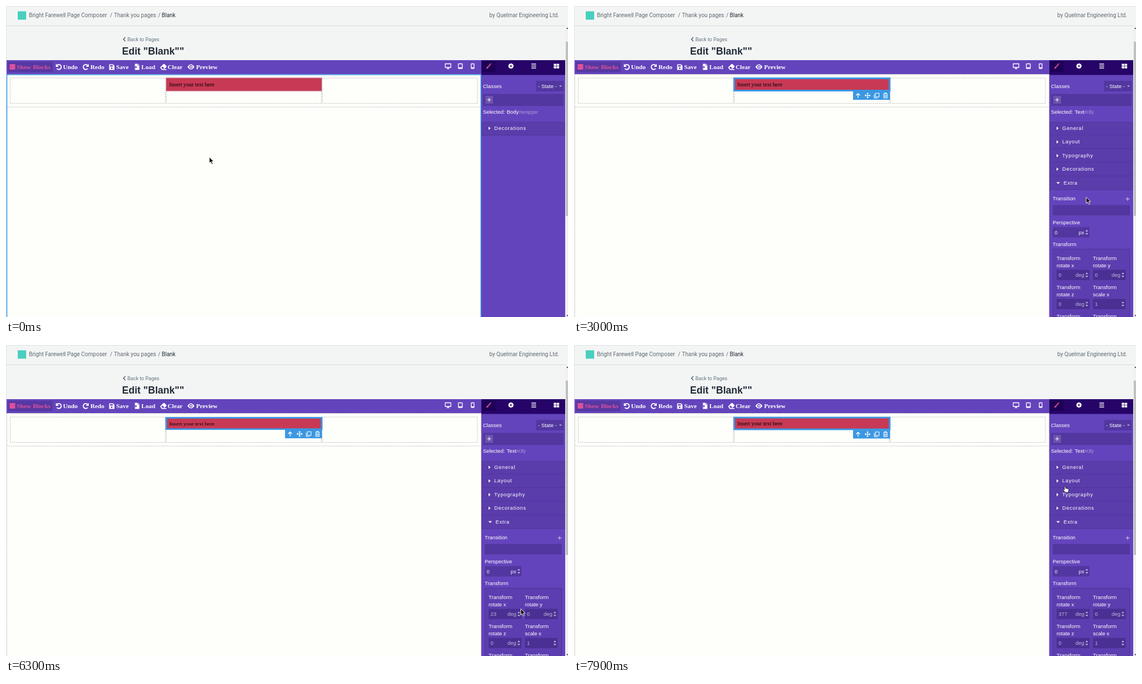
Recreate the animation shown at these times as an HTML page. Size 1005 by 557 pixels, loop 8000 ms.

```html
<!DOCTYPE html>
<html lang="en">
<head>
<meta charset="utf-8">
<title>Page editor</title>
<style>
html, body { margin: 0; width: 100%; height: 100%; overflow: hidden; background: #f3f5f5; }
svg { display: block; width: 100%; height: 100%; }
text { white-space: pre; }
.ui { font-family: Roboto, sans-serif; }
.side { font: 9.4px "Liberation Sans", Arial, sans-serif; fill: #fff; }
.head { font-size: 9.3px; letter-spacing: .7px; }
.bar { font: bold 11.2px "Liberation Serif", "Times New Roman", serif; fill: #fff; }
.badge { font: 8.4px "Liberation Sans", Arial, sans-serif; fill: #fff; }
.dash { fill: none; stroke: #bdbdbd; stroke-dasharray: 2 1.4; }
.line { fill: none; stroke: #fff; stroke-width: 1.3; }
.thin { fill: none; stroke: #fff; stroke-width: 1.1; }
.dim { fill: #fff; opacity: .65; }
.lit { fill: #fff; opacity: .95; }
</style>
</head>
<body>
<svg viewBox="0 0 1005 557" id="stage"></svg>
<script>
const BLUE = '#3b97e3', PURPLE = '#6444bc', FIELD = '#5237a0', DEEP = '#4a3093', EDGE = '#4d3398';

const rect = (x, y, w, h, fill, more = '') =>
  `<rect x="${x}" y="${y}" width="${w}" height="${h}" fill="${fill}" ${more}/>`;
const text = (x, y, s, more = '') => `<text x="${x}" y="${y}" ${more}>${s}</text>`;
const path = (d, more = 'fill="#fff"') => `<path d="${d}" ${more}/>`;
const group = (id, body) => `<g id="${id}">${body}</g>`;
const dash = (x, y, w, h) => rect(x, y, w, h, 'none', 'class="dash"');

const header = () =>
  rect(0, 0, 1005, 35, '#f3f5f4') +
  path('M0 .5H1005M.5 0V97', 'stroke="#dfe2e4"') +
  path('M0 35.5H1005', 'stroke="#d5dade"') +
  rect(21, 9.5, 15, 15, '#48cfc0') +
  `<g class="ui" font-size="10" fill="#5f6972">` +
  text(41, 20, 'Bright Farewell Page Composer') + text(186, 20, '/') +
  text(193, 20, 'Thank you pages') + text(272, 20, '/') +
  text(278.5, 20, 'Blank', 'fill="#212b36"') +
  text(989, 20, 'by Quelmar Engineering Ltd.', 'text-anchor="end"') +
  text(217, 63, 'Back to Pages', 'font-size="9" fill="#637381"') + '</g>' +
  path('M213.5 56l-3.5 3.6 3.5 3.6', 'fill="none" stroke="#55636f" stroke-width="1.5"') +
  text(207.5, 87, 'Edit "Blank""',
    'font-family="Liberation Sans, Arial, sans-serif" font-weight="bold" font-size="17.6" fill="#212b36"');

const undo = 'M90 104.5v3.5h3.5M90.3 107.6a4.4 4.4 0 1 1 .6 4.4';
const toolbar = () =>
  rect(1, 97, 849, 25, PURPLE) + rect(4, 100, 79.5, 18.5, '#5638a2') +
  rect(6.5, 104, 10, 10, '#dc4f9d') +
  '<g class="bar">' + text(19, 113, 'Show Blocks', 'fill="#dc4f9d"') +
  [[102, 'Undo'], [151, 'Redo'], [197, 'Save'], [242, 'Load'], [289, 'Clear'], [340, 'Preview']]
    .map(([x, s]) => text(x, 113, s)).join('') + '</g>' +
  path(undo, 'fill="none" stroke="#fff" stroke-width="1.9"') +
  path(undo, 'fill="none" stroke="#fff" stroke-width="1.9" transform="translate(237 0) scale(-1 1)"') +
  path('M184.5 104.5h7l2.5 2.5v7.5h-9.5zM186 106v2.5h5v-2.5zM189 110a1.5 1.5 0 1 0 .01 0z', 'fill="#fff" fill-rule="evenodd"') +
  path('M230.5 103.5h5v3h3v8h-8zM236.3 103.5l2.2 2.2h-2.2z') +
  path('M228 109.500h5.5m-2-2l2 2-2 2', `fill="none" stroke="${PURPLE}" stroke-width="1.1"`) +
  path('M275.5 110l6-6h2l3.5 3.5v1.5l-4 4h4v1.5h-8.5zM277.5 110.2l2.8 2.8h1.2l1.5-1.5-3-3z', 'fill="#fff" fill-rule="evenodd"') +
  path('M324.5 109q6-9 12.5 0-6.5 9-12.5 0z') +
  `<circle cx="330.7" cy="109" r="2.9" fill="${PURPLE}"/><circle cx="330.9" cy="109" r="1.6" fill="#fff"/>` +
  path('M785.5 103.5h10v6.5h-10zM790.5 110v2m-2.5 .3h5', 'class="line"') +
  rect(809, 103.5, 7, 8.5, 'none', 'class="line" rx=".8"') + path('M809 110.5h7', 'class="line"') +
  rect(832, 103.5, 5, 8.5, 'none', 'class="line" rx=".8"') + path('M832 110.5h5', 'class="line"');

const canvas = () =>
  rect(1, 122, 849, 435, '#fefefb') +
  dash(1.5, 122.5, 848, 440) + path('M1.5 181H849.5', 'class="dash"') +
  [7.5, 286.5, 565.5].map(x => dash(x, 129, 277.5, 45.5)).join('') +
  group('bodyLine', path('M1.5 557V123H849.3V557', `fill="none" stroke="${BLUE}" stroke-width="1.5"`)) +
  group('block',
    rect(286, 128.5, 279, 24, '#c83955') +
    text(292, 144, 'Insert your text here', 'font-family="Liberation Serif, Times New Roman, serif" font-size="10"') +
    group('frame', rect(286.5, 129.5, 278, 22, 'none', `stroke="${BLUE}" stroke-width="3"`))) +
  group('idle', rect(286.5, 129, 278, 23, 'none', 'stroke="#b9a6ac" stroke-dasharray="2 1.4"')) +
  group('hover', rect(286.5, 129, 278, 23, 'none', `stroke="${BLUE}" stroke-dasharray="3 1"`) +
    rect(286, 123.5, 20.5, 14, BLUE) + text(289, 133.5, 'Text', 'class="badge"')) +
  group('bodyBadge', rect(1, 123, 24, 15, BLUE) + text(3.5, 133.5, 'Body', 'class="badge"')) +
  group('tools', rect(499, 0, 66, 15.3, BLUE) +
    path('M508 12V4M504.5 7.5L508 4l3.5 3.5', 'class="line"') +
    path('M520.5 7.5h9M525 3v9M523.5 4.5L525 3l1.5 1.5M523.5 10.5L525 12l1.5-1.5M522 6l-1.5 1.5L522 9M528 6l1.5 1.5L528 9', 'class="thin"') +
    path('M539 3.5h6.5v6.5h-6.5zM537 5.5v6.5h6.5', 'class="thin"') +
    path('M553 4.5h8M555.5 4v-1h3v1M554 5.5v6.5h6v-6.5M556 6.5v4M558 6.5v4', 'class="thin"'));

const section = (y, name) =>
  rect(850, y, 150, 24.4, '#5a3cab') + rect(850, y + 23.6, 150, 1, EDGE) +
  path(`M863 ${y + 9}l3.5 3-3.5 3z`) + text(873, y + 15, name, 'class="head"');

const spinner = (x, y) => path(`M${x - 2.5} ${y - 1.5}l2.5-3 2.5 3zM${x - 2.5} ${y + 1.5}l2.5 3 2.5-3z`, 'class="dim"');
const field = (x, y, w, value, unit, { id = '', fill = DEEP, tone = 'dim' } = {}) =>
  rect(x, y, w, 18.5, fill, 'rx="1"') + text(x + 3.5, y + 12.5, value, `class="${tone}" id="${id}"`) +
  text(x + w - 9.5, y + 12.5, unit, `class="${tone}" text-anchor="end"`) + spinner(x + w - 5, y + 9.3);
const label = (x, y, name) => text(x, y, 'Transform') + text(x, y + 13, name);

const extra = () =>
  rect(850, 304.8, 150, 23.5, '#5a3cab') +
  path('M862.5 315.5h6.5l-3.2 3.2z') + text(875.5, 319.8, 'Extra', 'class="head"') +
  text(856, 348, 'Transition') +
  path('M986.5 345.5h7M990 342v7', 'stroke="#fff" opacity=".7"') +
  rect(856, 356.5, 138, 18.5, FIELD) +
  text(856, 391, 'Perspective') + field(856, 396, 66, '0', 'px', { fill: FIELD, tone: 'lit' }) +
  text(856, 430, 'Transform') +
  rect(856.5, 435.5, 137, 130, '#5d3eb0', `stroke="${EDGE}"`) +
  label(863, 455, 'rotate x') + label(928, 455, 'rotate y') +
  field(863, 472.5, 59, '0', 'deg', { id: 'angle' }) + field(928, 472.5, 58.5, '0', 'deg') +
  label(863, 507, 'rotate z') + label(928, 507, 'scale x') +
  field(863, 524.5, 59, '0', 'deg') + field(928, 524.5, 58.5, '1', '') +
  text(863, 559, 'Transform') + text(928, 559, 'Transform');

const gear = () => [0, 45, 90, 135].map(a =>
  rect(901.8, 102.7, 2.4, 9.6, '#fff', `transform="rotate(${a} 903 107.5)"`)).join('') +
  '<circle cx="903" cy="107.5" r="3.7" fill="#fff"/><circle cx="903" cy="107.5" r="1.5" fill="#260468"/>';

const panel = () =>
  rect(850, 97, 150, 460, PURPLE) + rect(850, 97, 150, 26.5, '#260468') + rect(851.5, 99, 24, 19, '#1d0155') +
  path('M867 102.5l1 1-4.5 5.5-1.7-1.5zM861.5 108l1.8 1.7q-1 3-5.3 2.3 1.8-.8 1.8-2.5z', 'fill="#dc4f9d"') +
  gear() +
  path('M939.5 104h8.5M939.5 107.5h8.5M939.5 111h8.5', 'class="line"') +
  [979.5, 984.7].map(x => rect(x, 103.5, 4.5, 3.8, '#fff') + rect(x, 108, 4.5, 3.8, '#fff')).join('') +
  '<g class="side">' +
  text(853, 147, 'Classes') + rect(948, 134, 49, 19, FIELD) +
  text(951.5, 147, '- State -') + path('M989 142.5h5l-2.5 2.5z', 'class="dim"') +
  rect(853, 157.5, 144, 21.5, FIELD) + rect(857, 161, 14, 14, '#6c53ae', 'rx="1"') +
  path('M860.5 168h7M864 164.5v7', 'class="thin"') +
  text(853, 193, 'Selected:') +
  text(895.5, 193, '<tspan id="kind"></tspan><tspan id="ref" font-size="8.3" fill-opacity=".45"></tspan>') +
  group('bodySections', section(207, 'Decorations')) +
  group('textSections', ['General', 'Layout', 'Typography', 'Decorations', 'Extra']
    .map((name, i) => section(207 + 24.45 * i, name)).join('')) +
  group('extra', extra()) + '</g>';

const scrollbar = () =>
  rect(1000, 35, 5, 522, '#f1f1f1') + rect(1001, 64, 4, 312, '#bfc0c0') +
  path('M1002 41l2-2.5 1 1.5v1zM1002 553.5l2 2.5 1-1.5v-1z', 'fill="#444"');

const cursors = () =>
  group('arrow', path('M.5 .5V11.5l2.5-2.3 2 4.3 2-.9-2-4.2h3.5z', 'fill="#111" stroke="#fff" stroke-width=".9"')) +
  group('hand', path('M2 1.2q1-1 2 0v3.3l4.5 1q1.3.5 1.2 2l-.7 4.5h-5.5l-4-4.7q.3-1.2 2.5.2z', 'fill="#fff" stroke="#222" stroke-width=".9"'));

stage.innerHTML = rect(0, 0, 1005, 557, '#f3f5f5') + header() + toolbar() + canvas() + panel() + scrollbar() + cursors();

const $ = id => document.getElementById(id);
const show = (id, on) => $(id).setAttribute('visibility', on ? 'visible' : 'hidden');

// Linear track of [time, ...values]
function at(keys, t) {
  const i = keys.findIndex(k => k[0] > t);
  if (i < 0) return keys[keys.length - 1].slice(1);
  const a = keys[i - 1], b = keys[i], u = (t - a[0]) / (b[0] - a[0]);
  return a.slice(1).map((v, j) => v + (b[j + 1] - v) * u);
}
const pointer = [
  [0, 363, 270], [500, 363, 270], [1000, 406, 148], [1100, 406, 148], [1200, 408, 140], [1800, 408, 140],
  [2300, 923, 319], [2800, 923, 319], [3300, 904, 376], [3600, 904, 376], [3800, 914, 407], [3900, 914, 407],
  [4000, 916, 418], [4400, 925, 477], [4500, 925, 477], [4800, 921, 490], [5000, 917, 479], [5200, 917, 479],
  [5300, 917, 478], [6200, 917, 478], [6300, 920, 472], [6800, 912, 404], [7900, 875, 252]
];
const rotation = [[0, 0], [6200, 0], [6300, 23], [6800, 121], [7900, 377]];

function draw(now) {
  const t = Math.floor(now % 8000 / 100) * 100;
  const [x, y] = at(pointer, t), deg = Math.round(at(rotation, t)[0]);
  const picked = t >= 1600, open = t >= 2900;
  const overBody = t >= 200 && t < 800 || t >= 1900 && t < 2200;
  const overText = t >= 900 && t < 1600;

  show('bodyLine', !picked || overBody);
  show('bodyBadge', overBody);
  show('idle', !picked && !overText);
  show('hover', overText);
  show('frame', picked);
  show('tools', picked);
  show('bodySections', !picked);
  show('textSections', picked);
  show('extra', open);
  $('kind').textContent = picked ? 'Text' : 'Body';
  $('ref').textContent = picked ? '#i3ly' : '#wrapper';
  $('angle').textContent = deg;

  const c = Math.cos(deg * Math.PI / 180);
  $('block').setAttribute('transform', `translate(0 140.5) scale(1 ${c}) translate(0 -140.5)`);
  $('tools').setAttribute('transform', `translate(0 ${140.5 + 12 * Math.abs(c) + .2})`);

  const onTitle = x > 850 && y > 207 && y < 329;
  show('hand', onTitle);
  show('arrow', !onTitle);
  for (const id of ['hand', 'arrow']) $(id).setAttribute('transform', `translate(${x} ${y})`);
  requestAnimationFrame(draw);
}
requestAnimationFrame(draw);
</script>
</body>
</html>
```
